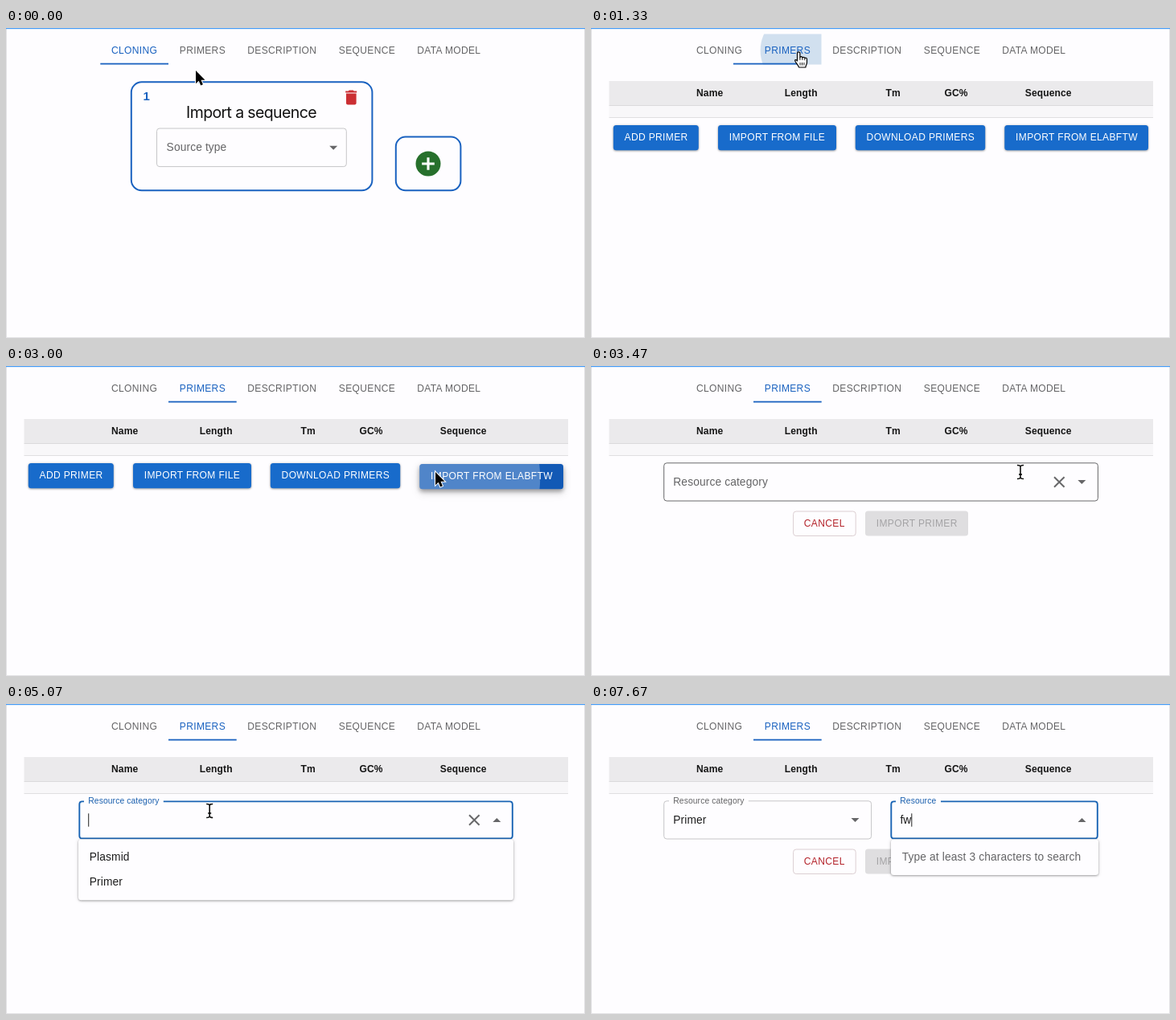
An HTML page that plays this animation: 720x386 px, repeating every 8000 ms.

```html
<!DOCTYPE html>
<html lang="en">
<head>
<meta charset="utf-8">
<title>Primer import</title>
<style>
  html, body { margin: 0; width: 100%; height: 100%; overflow: hidden; background: #fefdff; }
  svg { display: block; width: 100%; height: 100%; }
  text { font: 13.76px "Liberation Sans", Arial, sans-serif; letter-spacing: .13px; fill: #222; white-space: pre; }
  .caps { font-size: 12.04px; letter-spacing: .344px; }
  .head { font-size: 12.04px; font-weight: bold; fill: #151515; }
  .title { font: 19.5px Inter, sans-serif; letter-spacing: -.62px; fill: #111; }
  .num { font-size: 15px; font-weight: bold; fill: #1a62c0; }
  .btn { filter: drop-shadow(0 1.3px .8px rgba(0,0,0,.28)) drop-shadow(0 .8px 1.6px rgba(0,0,0,.16)); }
  .raised { filter: drop-shadow(0 3px 2.5px rgba(0,0,0,.28)) drop-shadow(0 3px 5px rgba(0,0,0,.2)); }
  .pop { filter: drop-shadow(0 1.2px .8px rgba(0,0,0,.3)) drop-shadow(0 .8px 2px rgba(0,0,0,.16)); }
</style>
</head>
<body>
<svg viewBox="0 0 720 386">
  <defs>
    <clipPath id="tabClip"><rect x="202" y="7.5" width="84.5" height="38"/></clipPath>
    <clipPath id="btnClip"><rect x="514.3" y="121" width="178.7" height="31.2" rx="3.5"/></clipPath>
  </defs>
  <g id="view"></g>
</svg>
<script>
const LOOP = 8000;
const BLUE = '#1a62c0', GREY = '#646466', LINE = '#c6c6c8', BG = '#fefdff';

// Moments of the story, in ms
const AT = {
  tabDown: 1055, tabUp: 1195, hover: 2640, btnDown: 2710, form: 3070,
  focus1: 4055, pick: 6000, hover2: 6700, focus2: 6890, typeF: 7330, typeW: 7600
};

const TABS = [['CLONING', 131], ['PRIMERS', 215.8], ['DESCRIPTION', 300.3], ['SEQUENCE', 413.8], ['DATA MODEL', 511.2]];
const HEADS = [['Name', 131], ['Length', 240.8], ['Tm', 366.5], ['GC%', 439.5], ['Sequence', 539.8]];
const BUTTONS = [
  ['ADD PRIMER', 27.8, 106], ['IMPORT FROM FILE', 158, 147],
  ['DOWNLOAD PRIMERS', 328.8, 161.4], ['IMPORT FROM ELABFTW', 514.3, 178.7]
];

// start, end, then the place reached
const MOVES = [
  [70, 870, 258.5, 30], [2000, 2700, 534, 132], [3470, 3930, 253.2, 133],
  [5400, 5600, 140, 212], [6400, 6780, 428, 155]
];
const POINTERS = [
  [0, 'arrow'], [400, 'hand'], [2200, 'arrow'], [AT.form, 'beam'], [5530, 'hand'],
  [AT.pick + 60, 'arrow'], [AT.hover2, 'beam'], [AT.typeF, 'none']
];

const clamp = v => Math.min(1, Math.max(0, v));
const mix = (a, b, p) => a + (b - a) * p;

function bezier(x1, y1, x2, y2) {
  const curve = (a, b, s) => 3 * (1 - s) * (1 - s) * s * a + 3 * (1 - s) * s * s * b + s * s * s;
  return v => {
    if (v <= 0) return 0;
    if (v >= 1) return 1;
    let lo = 0, hi = 1;
    for (let i = 0; i < 24; i++) {
      const mid = (lo + hi) / 2;
      if (curve(x1, x2, mid) < v) lo = mid; else hi = mid;
    }
    return curve(y1, y2, lo);
  };
}
const inOut = bezier(.4, 0, .2, 1);
const out = bezier(0, 0, .2, 1);
const glide = bezier(.42, 0, .58, 1);

const text = (s, x, y, cls = '', fill = '') =>
  `<text x="${x}" y="${y}" class="${cls}"${fill && ` style="fill:${fill}"`}>${s}</text>`;
const rect = (x, y, w, h, r, attrs) =>
  `<rect x="${x}" y="${y}" width="${w}" height="${h}" rx="${r}" ${attrs}/>`;
const path = (d, attrs) => `<path d="${d}" ${attrs}/>`;
const triangle = (x, y, up) =>
  path(`M${x - 5} ${y + (up ? 2.5 : -2.5)}h10l-5 ${up ? -5 : 5}z`, 'fill="#666668"');
const cross = x => path(`M${x - 6.3} 138.2l12.6 12.6m0 -12.6l-12.6 12.6`, 'stroke="#69696b" stroke-width="2" fill="none"');

function ripple(t, down, up, x, y, radius, fill, clip) {
  if (t < down || t > up + 550) return '';
  const p = inOut((t - down) / 550);
  const alpha = mix(.1, .3, p) * (1 - inOut((t - up) / 550));
  return `<g clip-path="url(#${clip})"><circle cx="${x}" cy="${y}" r="${radius * p}" fill="${fill}" opacity="${alpha}"/></g>`;
}

function tabs(t) {
  const active = t < AT.tabUp ? 0 : 1;
  const x = mix(117.3, 202, inOut((t - AT.tabUp) / 300));
  return ripple(t, AT.tabDown, AT.tabUp, 259.5, 28, 63, '#1a66ac', 'tabClip') +
    TABS.map(([s, tx], i) => text(s, tx, 31.9, 'caps', i === active ? BLUE : GREY)).join('') +
    rect(x, 43.7, 84.7, 1.8, 0, `fill="${BLUE}"`);
}

function cloning() {
  const frame = `fill="none" stroke="${BLUE}" stroke-width="2"`;
  return rect(155.8, 67.3, 299.6, 135, 13, frame) +
    rect(484.8, 135.6, 80.6, 66.7, 12, frame) +
    text('1', 170.5, 90, 'num') +
    path('M423 93.5c0 1.1.9 2 2 2h8.600c1.100 0 2-.9 2-2V81.500h-12.600zM436.200 78.500h-3.500l-1-1h-5l-1 1h-3.500v2h14z', 'fill="#cb2f33"') +
    `<text x="305" y="112" class="title" text-anchor="middle">Import a sequence</text>` +
    rect(187.5, 125, 235.8, 47.6, 3.5, `fill="none" stroke="${LINE}"`) +
    text('Source type', 199.6, 153, '', GREY) + triangle(407.2, 149.2) +
    '<circle cx="525" cy="169" r="15.5" fill="#27702c"/>' +
    path('M517.200 169h15.600M525 161.200v15.600', 'stroke="#fff" stroke-width="3.1"');
}

function table() {
  return rect(22.5, 66, 676.5, 30, 0, 'fill="#ebeaec"') +
    rect(22.5, 96, 676.5, 1, 0, 'fill="#dad9db"') +
    rect(22.5, 97, 676.5, 14, 0, 'fill="#f8f7f9"') +
    rect(22.5, 111, 676.5, 1, 0, 'fill="#e0dfe1"') +
    HEADS.map(([s, x]) => text(s, x, 85, 'head')).join('');
}

function primerButtons(t) {
  return BUTTONS.map(([s, x, w], i) => {
    const over = i === 3 && t >= AT.hover;
    const wave = over ? ripple(t, AT.btnDown, AT.form, 535, 138, 160, '#fff', 'btnClip') : '';
    return `<g transform="translate(0 ${over ? 1 : 0})">` +
      rect(x, 121, w, 31.2, 3.5, `fill="${over ? '#1259b5' : '#186bcb'}" class="${over ? 'raised' : 'btn'}"`) +
      wave + text(s, x + 13.8, 140.2, 'caps', '#fff') + '</g>';
  }).join('');
}

// Outlined input; gap is the share of the label notch that is open
function field({ x, w, label, labelWidth, rise, gap, focus, hover, tint }) {
  const pad = focus ? .6 : 0;
  const l = x + pad, r = x + w - pad, top = 120.8 + pad, bottom = 168 - pad;
  const a = x + 6.3, b = a + (labelWidth + 10.5) * gap;
  const color = focus ? '#1964b4' : hover ? '#68686a' : LINE;
  const d = `M${b} ${top}H${r - 3.5}q3.5 0 3.500 3.500V${bottom - 3.5}q0 3.500 -3.500 3.500H${l + 3.5}` +
    `q-3.500 0 -3.500 -3.500V${top + 3.5}q0 -3.500 3.500 -3.500H${a}`;
  const size = mix(1, .75, rise);
  return path(d, `fill="none" stroke="${color}" stroke-width="${focus ? 1.9 : 1}"`) +
    `<text transform="translate(${x + 11.6} ${mix(149, 124, rise)}) scale(${size})" style="fill:${tint}">${label}</text>`;
}

const caretOn = (t, start) => t >= start && (t - start) % 1000 < 500;
const caret = x => rect(x, 136.3, 1, 16.4, 0, 'fill="#222"');
const rising = (t, start) => ({
  rise: out((t - start) / 200),
  gap: clamp((t - start - 50) / 100),
  tint: t > start + 60 ? '#1a5fae' : GREY
});

function popup(x, w, h, rows, fill) {
  return rect(x, 168.5, w, h, 3.5, `fill="${BG}" class="pop"`) +
    rows.map((s, i) => text(s, x + 13.8, 195.2 + 31 * i, '', fill)).join('');
}

function formButtons() {
  return rect(251.6, 181, 77.6, 30.5, 3.5, 'fill="none" stroke="#dccfd2"') +
    text('CANCEL', 264.8, 200.2, 'caps', '#b4232b') +
    rect(341, 180.6, 128, 31, 3.5, 'fill="#dfdee0"') +
    text('IMPORT PRIMER', 354.8, 200.2, 'caps', '#a4a3a5');
}

function form(t) {
  const picked = t >= AT.pick, second = t >= AT.focus2;
  const width = picked ? 257.9 : 539.7, right = 90.7 + width;
  const focus = t >= AT.focus1 && !second;
  const open = focus && !picked;
  const first = rising(t, AT.focus1);
  if (second) first.tint = GREY;
  let s = formButtons() +
    field({ x: 90.7, w: width, label: 'Resource category', labelWidth: 88.3, focus, hover: t < AT.focus1, ...first }) +
    triangle(right - 20.1, 144.6, open);
  if (!second) s += cross(right - 48.1);
  if (!picked) {
    if (open) s += popup(90, 541, 75.8, ['Plasmid', 'Primer'], '#1c1c1c');
    return s + (caretOn(t, AT.focus1) ? caret(102.2) : '');
  }
  s += text('Primer', 102.3, 149, '', '#1c1c1c') +
    field({
      x: 372.7, w: 257.7, label: 'Resource', labelWidth: 45.5,
      focus: second, hover: t >= AT.hover2, ...rising(t, AT.focus2)
    }) + triangle(610.5, 144.6, second);
  if (second) {
    const value = t < AT.typeF ? '' : t < AT.typeW ? 'f' : 'fw';
    const start = [AT.focus2, AT.typeF, AT.typeW][value.length];
    s += popup(373, 258, 44.5, ['Type at least 3 characters to search'], GREY) +
      text(value, 384.4, 149, '', '#1c1c1c');
    if (caretOn(t, start)) s += caret(384.4 + [0, 3.9, 13.9][value.length]);
  }
  return s;
}

const SHAPES = {
  arrow: path('M0 0V16.200L3.700 12.800L6.200 18.500L8.900 17.300L6.500 11.800H11.500Z',
    'fill="#000" stroke="#fff" stroke-width="2" paint-order="stroke"'),
  hand: path('M-2 11V1.500a1.700 1.700 0 0 1 3.400 0V7a1.500 1.500 0 0 1 3 .3a1.500 1.500 0 0 1 2.900.5a1.500 1.500 0 0 1 2.700 1V13' +
    'c0 2.500-1.600 3.500-1.600 6H0C-.5 16.500-3 14.500-4.500 11.500C-5.500 9.300-3.500 8.800-2 11Z',
    'fill="#fff" stroke="#000" stroke-width="1.2" stroke-linejoin="round"') +
    path('M1.400 7v3M4.400 7.500v2.500M7.300 8.200v2M1.600 13v3.500M4 13v3.500M6.400 13v3.500', 'stroke="#000" stroke-width=".9"'),
  beam: [['#fff', 3], ['#000', 1.5]].map(([c, w]) =>
    path('M-4 -8.500Q0 -8.500 0 -6.500Q0 -8.500 4 -8.500M0 -6.500V6.500M-4 8.500Q0 8.500 0 6.500Q0 8.500 4 8.500M-2 3H2',
      `fill="none" stroke="${c}" stroke-width="${w}"`)).join(''),
  none: ''
};

function pointer(t) {
  let x = 236, y = 53;
  for (const [from, to, nx, ny] of MOVES) {
    const p = glide((t - from) / (to - from));
    x = mix(x, nx, p);
    y = mix(y, ny, p);
  }
  const kind = POINTERS.filter(([at]) => t >= at).pop()[1];
  return `<g transform="translate(${x} ${y})">${SHAPES[kind]}</g>`;
}

const EDGE = rect(0, 0, 720, 386, 0, `fill="${BG}"`) +
  path('M.5 0V386M719.500 0V386M0 385.500H720', 'stroke="#e3e2e5"') +
  rect(0, 0, 720, 1.2, 0, 'fill="#469bf5"');

function scene(t) {
  const panel = t < AT.tabUp ? cloning() : table() + (t < AT.form ? primerButtons(t) : form(t));
  return EDGE + tabs(t) + panel + pointer(t);
}

const view = document.getElementById('view');
let shown = '', origin = null;
function tick(now) {
  if (origin === null) origin = now;
  const next = scene((now - origin) % LOOP);
  if (next !== shown) view.innerHTML = shown = next;
  requestAnimationFrame(tick);
}
view.innerHTML = shown = scene(0);
requestAnimationFrame(tick);
</script>
</body>
</html>
```
